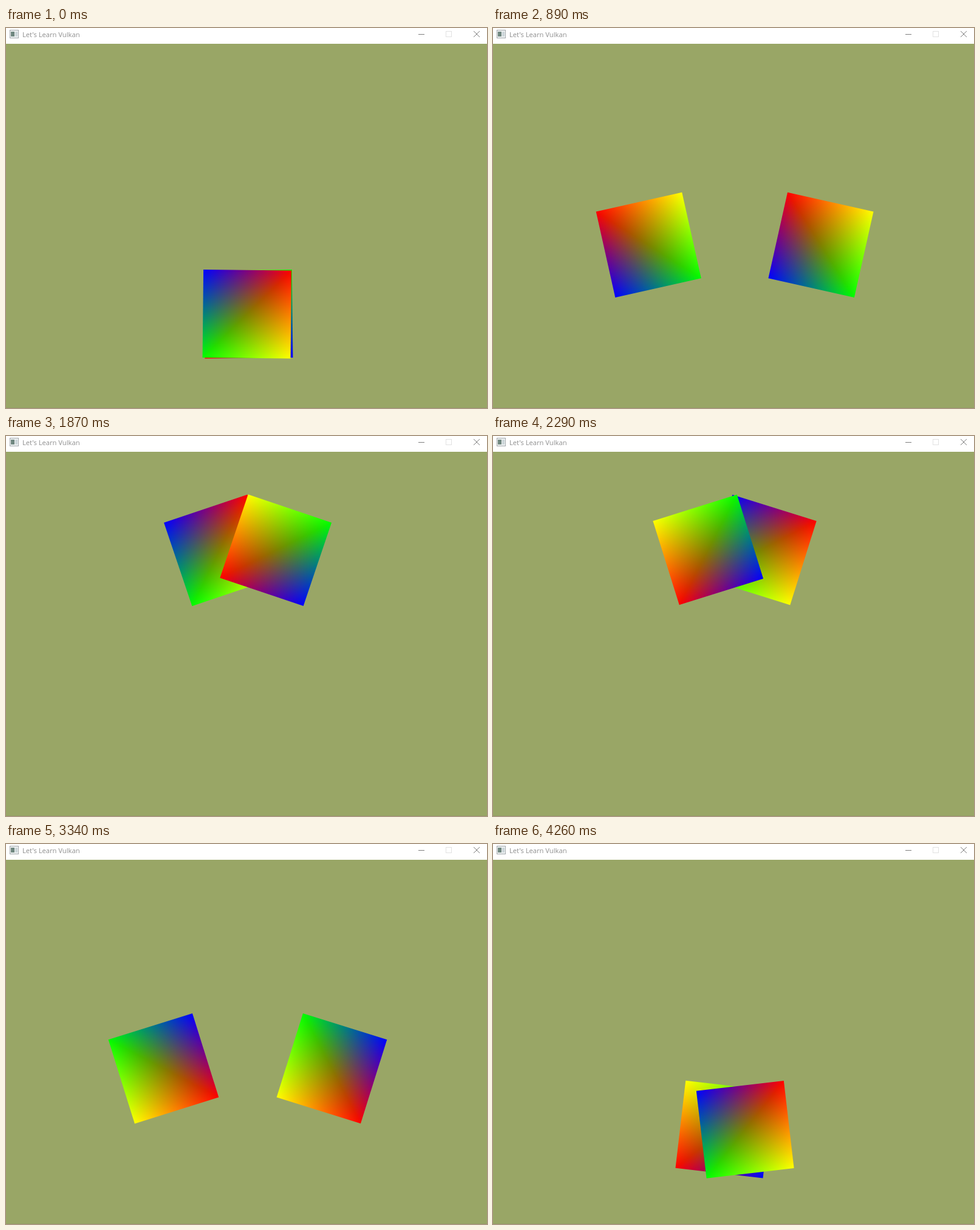
Recreate the animation shown at these times as an HTML page. Size 792 by 626 pixels, loop 4.33 s.

```html
<!DOCTYPE html>
<html lang="en">
<head>
<meta charset="utf-8">
<title>Let's Learn Vulkan</title>
<style>
  html, body { margin: 0; width: 100%; height: 100%; overflow: hidden; }
  body { position: relative; background: #99a666; }

  .bar { position: absolute; left: 0; top: 0; display: block; background: #fff; }
  .bar text { font: 11.2px "Open Sans", "Noto Sans", sans-serif; fill: #8e8e8e; }
  .edge { position: absolute; left: 0; right: 0; top: 625px; height: 1px; background: #929d64; }

  /* Each arm pivots on the orbit centre; its square hangs one side length below. */
  .arm {
    --side: 144.85px;
    position: absolute; left: 398.25px; top: 326px; width: 0; height: 0;
    animation: orbit 4330ms infinite;
  }
  .mirror { scale: -1 1; }

  /* One channel per layer: red falls downwards, green grows rightwards,
     blue fills the half below the diagonal. */
  .square {
    position: absolute;
    width: var(--side); height: var(--side);
    left: calc(var(--side) / -2); top: calc(var(--side) / -2);
    background:
      linear-gradient(to bottom, #f00, #000),
      linear-gradient(to right, #000, #0f0),
      linear-gradient(to top right, #00f, #000 50%),
      #000;
    background-blend-mode: screen;
    transform: translateY(var(--side)) rotate(90deg);
  }
  .mirror .square { transform: translateY(var(--side)) scaleX(-1) rotate(-90deg); }

  @keyframes orbit {
    0%     { transform: rotate(0.6deg);     animation-timing-function: steps(1); }
    1.61%  { transform: rotate(-5.4deg);    animation-timing-function: steps(7); }
    12.47% { transform: rotate(-47.4deg);   animation-timing-function: steps(5); }
    20.55% { transform: rotate(-77.4deg);   animation-timing-function: steps(8); }
    33.48% { transform: rotate(-125.3deg);  animation-timing-function: steps(12); }
    52.88% { transform: rotate(-197.4deg);  animation-timing-function: steps(10); }
    69.05% { transform: rotate(-257.25deg); animation-timing-function: steps(5); }
    77.13% { transform: rotate(-287.4deg);  animation-timing-function: steps(1); }
    78.98% { transform: rotate(-294.8deg);  animation-timing-function: steps(4); }
    85.45% { transform: rotate(-318.9deg);  animation-timing-function: steps(8); }
    98.38%, 100% { transform: rotate(-366.65deg); }
  }
</style>
</head>
<body>
  <div class="arm mirror"><div class="square"></div></div>
  <div class="arm"><div class="square"></div></div>
  <div class="edge"></div>

  <svg class="bar" width="792" height="26" viewBox="0 0 792 26">
    <rect x="6.5" y="3.5" width="14" height="13" fill="#eef1f2" stroke="#a3a9ad"/>
    <rect x="8" y="6" width="6" height="8" fill="#6f8780"/>
    <rect x="15" y="6" width="4" height="8" fill="#ccd6d9"/>
    <text x="27" y="15">Let's Learn Vulkan</text>
    <g fill="none" stroke="#7d7d7d">
      <path d="M679 10.5h10"/>
      <rect x="724.5" y="5.5" width="9" height="9" stroke="#e2e2e2"/>
      <path d="M770 5l10 10M780 5l-10 10"/>
    </g>
  </svg>
</body>
</html>
```
